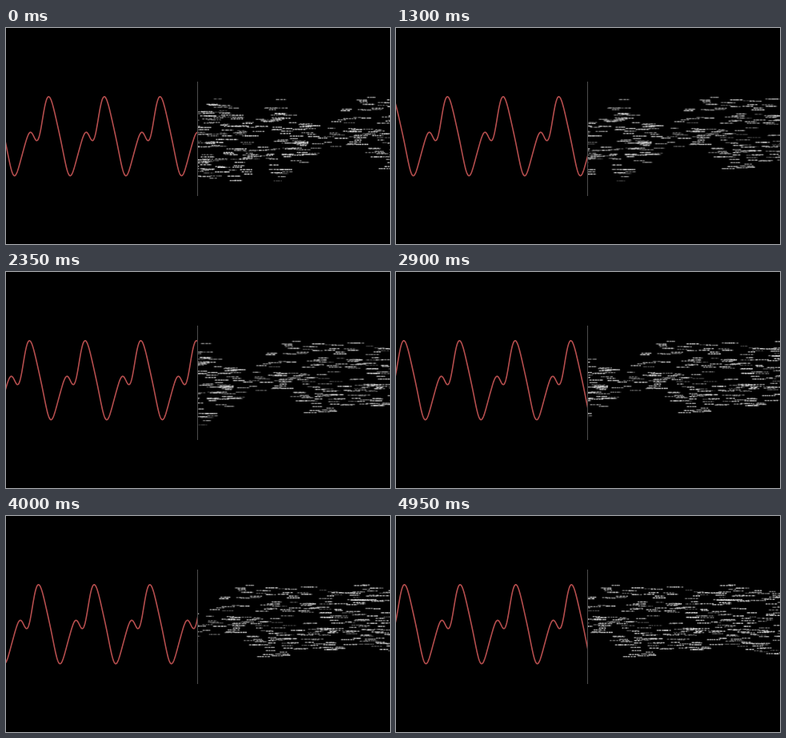
Write an HTML page with a canvas that moves like this. It is 480 by 270 pixels and loops after 5000 ms.

```html
<!DOCTYPE html>
<html lang="en">
<head>
<meta charset="utf-8">
<title>Scrolling wave and raster</title>
<style>
  html, body { margin: 0; width: 100%; height: 100%; overflow: hidden; background: #000; }
  canvas { display: block; }
</style>
</head>
<body>
<canvas id="stage" width="480" height="270"></canvas>
<script>
const ctx = document.getElementById('stage').getContext('2d');
const LOOP = 5000, SLOT = 50, PERIOD = 69.6, PEAK = 52.8, START = 230;

// [ms, distance scrolled], with three short rests
const travel = [[0, 0], [550, 29], [1300, 58.6], [1350, 58.6], [2350, 93.6],
  [3350, 129.2], [3450, 129.2], [4000, 151.9], [4050, 151.9], [4950, 182]];

// Cosine and sine parts of the wave's harmonics
const harmonics = [[-35.7, 8.8], [-8.3, -15.5], [-5.3, 2.9], [-1.7, 1.9], [.7, 0]];

// Outline of the dash cloud: [x, top, bottom]
const outline = [[220, 115, 190], [270, 84, 188], [298, 112, 193], [318, 110, 160],
  [340, 84, 192], [368, 118, 172], [395, 122, 150], [425, 100, 146], [450, 84, 155],
  [486, 88, 191], [520, 84, 165], [555, 92, 168], [600, 84, 160], [670, 92, 178]];

let seed = 7;
function rand() {
  seed = (seed * 16807) % 2147483647;
  return seed / 2147483647;
}

// Linear interpolation in column `col` of rows sorted by their first value
function lookup(rows, at, col) {
  const k = Math.max(1, rows.findIndex(row => row[0] >= at));
  const a = rows[k - 1], b = rows[k];
  return a[col] + (b[col] - a[col]) * (at - a[0]) / (b[0] - a[0]);
}

function waveY(x) {
  const angle = 2 * Math.PI * x / PERIOD;
  return harmonics.reduce((y, [c, s], i) =>
    y + c * Math.cos((i + 1) * angle) + s * Math.sin((i + 1) * angle), 136.3);
}

function drawWave(shift) {
  ctx.beginPath();
  for (let x = -1; x <= 241; x += .5) ctx.lineTo(x, waveY(x + shift - PEAK));
  ctx.strokeStyle = '#b64e4e';
  ctx.lineWidth = 1.6;
  ctx.stroke();
}

function drawDash(c, x, y) {
  const end = x + 9 + rand() * 9, light = .2 + rand() * .6;
  c.fillStyle = `rgba(210,210,210,${light * .5})`;
  c.fillRect(x, y, end - x, 1.5);
  c.fillStyle = `rgba(225,225,225,${light})`;
  for (let bit = x + 1; bit < end - 1; bit += 1.5 + rand() * 3) {
    c.fillRect(bit, y, 1 + rand() * 1.6, 1.4);
  }
}

// The dashes are drawn once on a long strip
function makeStrip() {
  const strip = document.createElement('canvas');
  strip.width = 460;
  strip.height = 270;
  const c = strip.getContext('2d');
  for (let i = 0; i < 820; i++) {
    const x = 222 + rand() * 446, y = 84 + rand() * 109;
    if (y >= lookup(outline, x, 1) && y <= lookup(outline, x, 2)) {
      drawDash(c, x - START - 7, y);
    }
  }
  return strip;
}

function clipped(x, width, draw) {
  ctx.save();
  ctx.beginPath();
  ctx.rect(x, 0, width, 270);
  ctx.clip();
  draw();
  ctx.restore();
}

const strip = makeStrip();

function frame() {
  const time = performance.now() % LOOP;
  const shift = lookup(travel, Math.floor(time / SLOT) * SLOT, 1);
  ctx.fillStyle = '#000';
  ctx.fillRect(0, 0, 480, 270);
  clipped(0, 239, () => drawWave(shift));
  clipped(240, 240, () => ctx.drawImage(strip, START - shift, 0));
  ctx.fillStyle = '#4c4c4c';
  ctx.fillRect(239, 67, 1, 143);
  requestAnimationFrame(frame);
}

frame();
</script>
</body>
</html>
```
